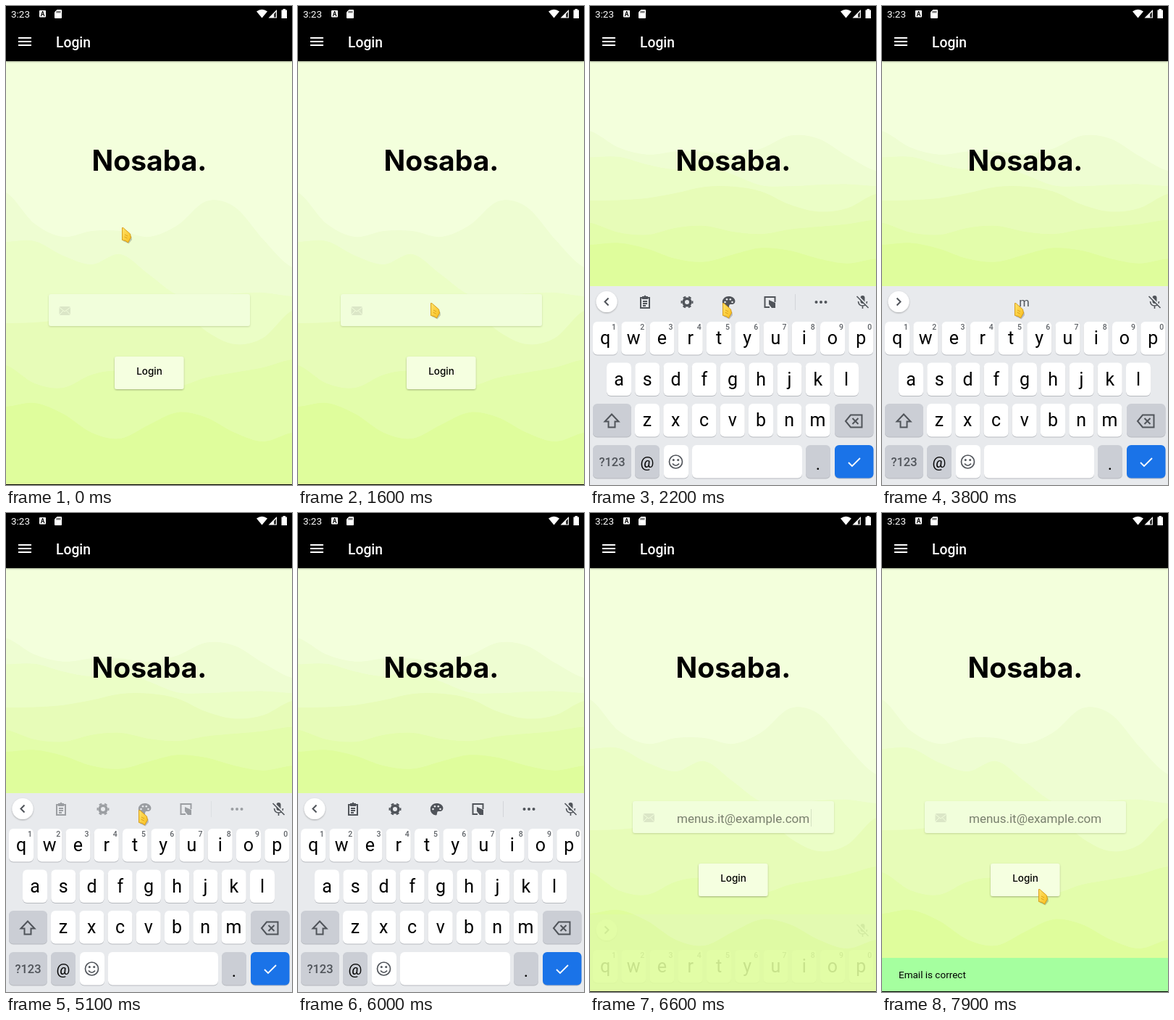
These frames come from a looping animation (395x660 px, 8000 ms). An HTML page:

```html
<!DOCTYPE html>
<html lang="en">
<head>
<meta charset="utf-8">
<title>Login</title>
<style>
html, body { margin: 0; width: 100%; height: 100%; overflow: hidden; background: #000; }
svg { display: block; width: 395px; height: 660px; font-family: Roboto, sans-serif; }
.brand { font-family: Inter, sans-serif; }
.mid { text-anchor: middle; }
.line { fill: none; stroke: #50545a; stroke-width: 2; }
.icon { fill: #50545a; }
</style>
</head>
<body>
<svg viewBox="0 0 395 660">
  <defs>
    <filter id="shade" x="-20%" y="-20%" width="140%" height="150%">
      <feDropShadow dx="0" dy="1" stdDeviation="1" flood-opacity=".3"/>
    </filter>
    <filter id="faint" x="-5%" y="-20%" width="110%" height="150%">
      <feDropShadow dx="0" dy="1" stdDeviation=".8" flood-color="#8a9a60" flood-opacity=".4"/>
    </filter>
    <linearGradient id="gold" x2="1" y2="1">
      <stop offset="0" stop-color="#ffe36a"/><stop offset="1" stop-color="#f8bd1c"/>
    </linearGradient>
  </defs>

  <rect y="76" width="395" height="583" fill="#f3ffdc"/>
  <g id="waves"></g>
  <text class="brand mid" x="198" y="227" font-size="39" font-weight="700">Nosaba.</text>

  <g id="form">
    <rect x="59" y="397" width="278" height="44" rx="3" fill="#f1fedb" filter="url(#faint)"/>
    <rect x="73.500" y="414" width="15.500" height="12" rx="2" fill="#dbe6c7"/>
    <path d="M74 415.500L81 421L88.500 415.500M74 425L79 420M88.500 425L83.500 420" fill="none" stroke="#f1fedb"/>
    <text id="email" x="120" y="427" font-size="17" fill="#000" fill-opacity=".5">menus.it@example.com</text>
    <path id="caret" d="M305.500 408V432" stroke="#d5e2c2"/>
    <rect x="150" y="483" width="95.500" height="45" rx="3" fill="#f5ffe0" filter="url(#shade)"/>
    <text class="brand mid" x="198" y="508" font-size="13.500" font-weight="500">Login</text>
  </g>

  <g id="snack">
    <rect y="613" width="395" height="47" fill="#a5ff9f"/>
    <text x="23" y="641" font-size="13.500">Email is correct</text>
  </g>
  <rect y="659" width="395" height="1"/>

  <rect width="395" height="76" filter="url(#shade)"/>
  <g fill="#fff">
    <text x="7" y="16" font-size="13.500">3:23</text>
    <rect x="46" y="6" width="9" height="9.500" rx="1"/>
    <text class="mid" x="50.500" y="14" font-size="8.500" font-weight="700" fill="#000">A</text>
    <path d="M70.500 5H76Q77 5 77 6V16Q77 17 76 17H68Q67 17 67 16V8.500Z"/>
    <path d="M70.500 7V9.500M72.500 7V9.500M74.500 7V9.500" stroke="#000"/>
    <path d="M346 7.500Q353.500 2 361 7.500L353.500 16.500Z"/>
    <path d="M374 5V16.500H362.500Z"/>
    <path d="M373 8V15.500H370V11Z" fill="#333"/>
    <path d="M382.500 4H386V5.500H388V17H380.500V5.500H382.500Z"/>
    <path d="M17 43H35V45H17ZM17 48H35V50H17ZM17 53H35V55H17Z"/>
    <text x="69" y="57" font-size="19.300" font-weight="500">Login</text>
  </g>

  <g id="keyboard">
    <rect y="386" width="395" height="274" fill="#e8eaed"/>
    <circle cx="23" cy="407.500" r="14.500" fill="#fff" filter="url(#shade)"/>
    <path id="chevron" class="line"/>
    <g id="tools">
      <path class="line" d="M70 402H82V416H70Z"/>
      <path class="icon" d="M72 400H74.500Q76 397 77.500 400H80V404H72Z"/>
      <path class="line" stroke-width="1.500" d="M73 407H79M73 410H79M73 413H77"/>
      <circle class="line" cx="134" cy="408" r="4.800" style="stroke-width:3.600"/>
      <circle class="line" cx="134" cy="408" r="7.500" stroke-dasharray="3.927" stroke-dashoffset="2"/>
      <path class="icon" d="M191.500 400C202 400 203 411 196 411H194C191 411 193 416.500 190.500 416.500A8.200 8.200 0 0 1 191.500 400Z"/>
      <g fill="#e8eaed"><circle cx="186.500" cy="408" r="1.300"/><circle cx="189" cy="404.200" r="1.300"/><circle cx="193.800" cy="404.200" r="1.300"/><circle cx="196.500" cy="408" r="1.300"/></g>
      <path class="line" d="M248 415H241.500V401H255.500V408"/>
      <path class="icon" d="M247 405L256 409V416H251L247 411Z"/>
      <path d="M283.500 397V419" stroke="#d2d5d9"/>
      <g class="icon"><circle cx="312.500" cy="408" r="2"/><circle cx="319" cy="408" r="2"/><circle cx="325.500" cy="408" r="2"/></g>
    </g>
    <g id="hints" class="mid" font-size="16.500" fill="#50545a">
      <text id="hintLeft" x="86.500" y="414"></text>
      <text id="hintMid" x="196.500" y="414"></text>
      <text id="hintRight" x="307" y="414"></text>
      <path id="hintBars" d="M142.500 397V419M250.500 397V419" stroke="#d2d5d9"/>
    </g>
    <rect class="icon" x="373.500" y="399" width="6" height="11" rx="3"/>
    <path class="line" d="M370.500 407Q371 413 376.500 413Q382 413 382.500 407M376.500 413V417" style="stroke-width:1.600"/>
    <path d="M369 398.500L385 414.500" stroke="#e8eaed" stroke-width="2"/>
    <path class="line" d="M368.500 400L384.500 416" style="stroke-width:1.600"/>
    <g id="keys"></g>
    <path class="line" d="M30 562.500L20.500 572.500H25.500V580.500H34.500V572.500H39.500Z"/>
    <path class="line" d="M360 563.500H375.500V580.500H360L353 572ZM362.500 568L370.500 576M370.500 568L362.500 576"/>
    <circle class="line" cx="118.500" cy="628" r="9" style="stroke-width:1.700"/>
    <path class="line" d="M114 630.500Q118.500 636 123 630.500" style="stroke-width:1.700"/>
    <g class="icon"><circle cx="115.300" cy="625.500" r="1.500"/><circle cx="121.700" cy="625.500" r="1.500"/></g>
    <path d="M357 629L362 634L373 623" fill="none" stroke="#fff" stroke-width="1.800"/>
  </g>

  <g id="cursor">
    <path d="M2 2L13.500 13L14 17L9.500 22.500L2 19Z" fill="#000" opacity=".2"/>
    <path d="M.5 .5Q2 0 4 2.500L11.500 9L12.500 14L8.500 21L5 18.500L.5 17.500Z" fill="url(#gold)" stroke="#d4960f" stroke-width=".9"/>
    <path d="M4 10L8 12M3.500 13L7.500 15" stroke="#d4960f" stroke-width=".8"/>
  </g>
</svg>
<script>
const LOOP = 8000, STEP = 100, TOP = 76;
const $ = id => document.getElementById(id);
const show = (id, on) => $(id).setAttribute('opacity', Number(on));
const move = (id, x, y) => $(id).setAttribute('transform', `translate(${x} ${y})`);

// Each wave: colour and heights at even steps across the stage.
const waves = [
  ['#eefdd2', 257, 300, 318, 310, 310, 318, 302, 269, 277, 322, 360],
  ['#ebfec6', 325, 324, 344, 356, 342, 370, 398, 400, 396, 395, 400],
  ['#e7fcb8', 437, 436, 431, 418, 402, 401, 414, 448, 466, 457, 420],
  ['#e3fdab', 495, 520, 526, 508, 503, 518, 524, 512, 505, 498, 487],
  ['#dffd9c', 552, 547, 562, 588, 596, 577, 560, 567, 588, 600, 588]
];

function wavePath([colour, ...ys]) {
  const dx = 395 / (ys.length - 1);
  const slope = i => ((ys[i + 1] ?? ys[i]) - (ys[i - 1] ?? ys[i])) / 6;
  let d = `M0 ${ys[0]}`;
  for (let i = 1; i < ys.length; i++) {
    const x = i * dx;
    d += `C${x - dx * 2 / 3} ${ys[i - 1] + slope(i - 1)} ${x - dx / 3} ${ys[i] - slope(i)} ${x} ${ys[i]}`;
  }
  return `<path fill="${colour}" d="${d}V659H0Z"/>`;
}
$('waves').innerHTML = waves.map(wavePath).join('');

function key(x, y, w, fill, label = '', size = 25, baseline = 31, extra = '') {
  return `<rect x="${x}" y="${y + 1}" width="${w}" height="45.500" rx="6" fill="#b7babf"/>
    <rect x="${x}" y="${y}" width="${w}" height="45.500" rx="6" fill="${fill}"/>
    <text class="mid" x="${x + w / 2}" y="${y + baseline}" font-size="${size}" ${extra}>${label}</text>`;
}
const WHITE = '#fff', GREY = '#cbced5', PITCH = 39.25;
const row = (letters, x, y) => [...letters].map((c, i) => key(x + i * PITCH, y, 34, WHITE, c)).join('');
const digits = [...'1234567890'].map((c, i) =>
  `<text class="mid" x="${33 + i * PITCH}" y="446" font-size="10.500" font-weight="500" fill="#5f6368">${c}</text>`);
$('keys').innerHTML = row('qwertyuiop', 4, 435) + digits.join('') +
  row('asdfghjkl', 23, 491.5) + row('zxcvbnm', 62, 548) +
  key(4, 548, 53, GREY) + key(338, 548, 53.5, GREY) +
  key(4, 605, 53, GREY, '?123', 16.5, 29, 'font-weight="500" fill="#50545a"') +
  key(62, 605, 34, GREY, '@', 21, 31) + key(102, 605, 34, WHITE) + key(141, 605, 152, WHITE) +
  key(298, 605, 34, GREY, '.', 24, 34) + key(338, 605, 53.5, '#1a73e8');

// Pointer stops: time, x, y.
const stops = [
  [0, 160, 305], [100, 135, 318], [200, 95, 345], [300, 54, 400], [400, 85, 445], [500, 165, 457],
  [600, 250, 445], [700, 287, 400], [800, 240, 357], [900, 165, 341], [1000, 105, 362],
  [1100, 88, 392], [1300, 125, 405], [1600, 183, 409], [5500, 183, 409], [5700, 150, 480],
  [5900, 86, 633], [6000, 75, 690], [6800, 80, 670], [6900, 101, 637], [7400, 216, 518], [8000, 216, 518]
];
// Keyboard stops: time, drop, opacity.
const slides = [
  [0, 274, 0], [1900, 274, 0], [2000, 110, .45], [2100, 25, .9], [2200, 0, 1], [6400, 0, 1],
  [6500, 60, .65], [6600, 167, .1], [6700, 274, 0], [8000, 274, 0]
];
const snackDrops = [[0, 47, 0], [7600, 47, 0], [7700, 32, 0], [7800, 9, 0], [7900, 0, 0], [8000, 0, 0]];

function sample(list, t) {
  const i = list.findIndex(s => s[0] > t);
  const a = list[i - 1], b = list[i], p = (t - a[0]) / (b[0] - a[0]);
  return [a[1] + (b[1] - a[1]) * p, a[2] + (b[2] - a[2]) * p];
}

function draw(now) {
  const t = Math.floor(now % LOOP / STEP) * STEP;
  const between = (from, to) => t >= from && t < to;

  const open = between(2100, 6500);
  const scale = open ? 310 / 583 : 1;
  $('waves').setAttribute('transform', `translate(0 ${TOP * (1 - scale)}) scale(1 ${scale})`);
  show('form', !open);
  show('email', t >= 6000);
  show('caret', between(6500, 6700));

  const [drop, opacity] = sample(slides, t);
  move('keyboard', 0, drop);
  show('keyboard', opacity);

  const tools = t < 3800 || between(5100, 6500);
  show('tools', tools ? (t === 5100 ? .5 : 1) : 0);
  $('chevron').setAttribute('d', tools ? 'M25.500 402.500L20.500 407.500L25.500 412.500' : 'M20.500 402.500L25.500 407.500L20.500 412.500');

  const split = t >= 4200;
  show('hints', between(3800, 5100));
  show('hintBars', split);
  const typed = 'menus'.slice(0, Math.max(0, Math.floor((t - 3800) / 200) + 1));
  $('hintLeft').textContent = split ? typed : '';
  $('hintMid').textContent = split ? 'Men' : typed;
  $('hintRight').textContent = split ? 'mentioned' : '';

  move('snack', 0, sample(snackDrops, t)[0]);
  move('cursor', ...sample(stops, t));
}

function tick() {
  draw(performance.now());
  requestAnimationFrame(tick);
}
tick();
</script>
</body>
</html>
```
